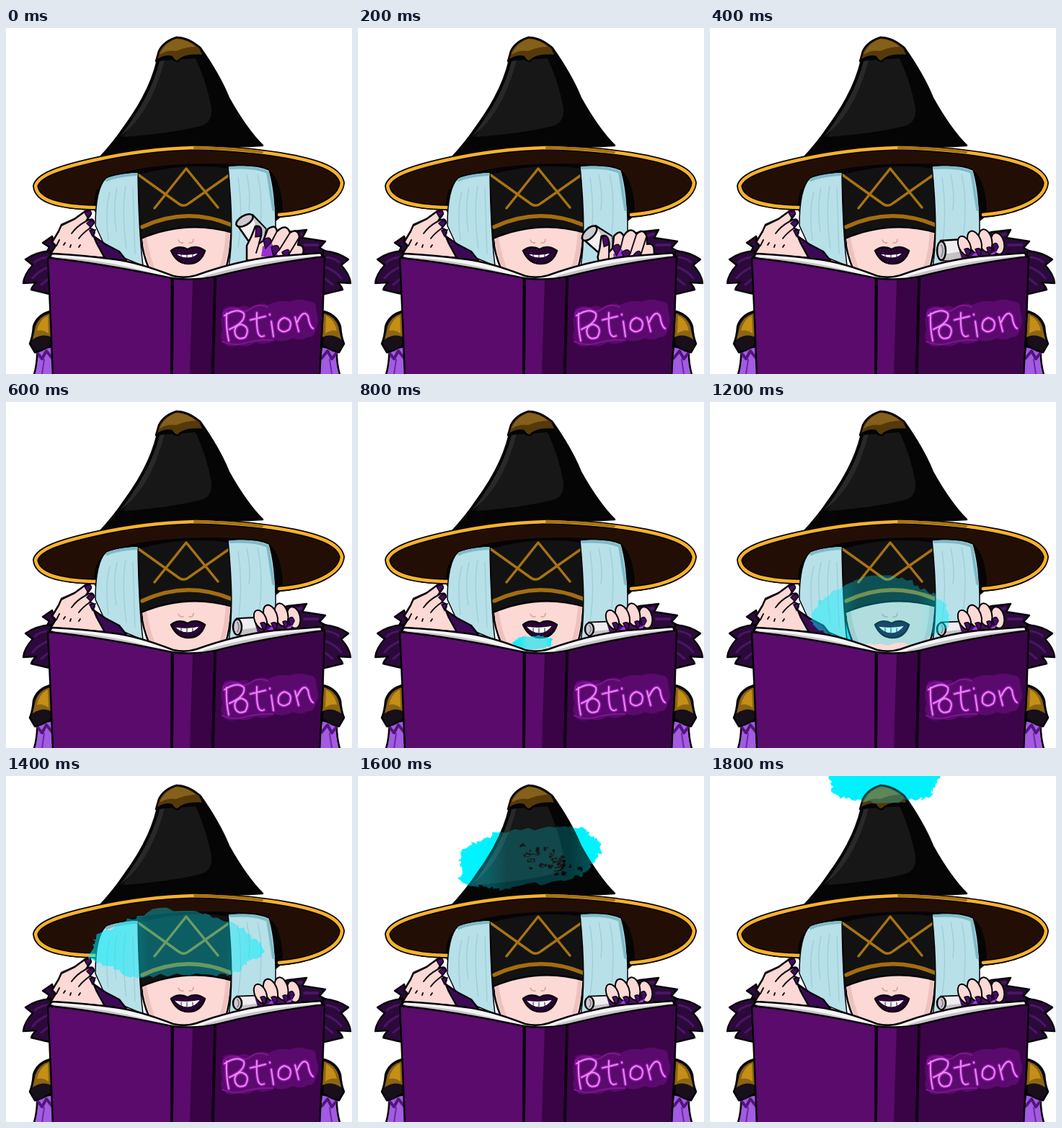
These frames come from a looping animation (480x480 px, 2000 ms). An HTML page:

```html
<!DOCTYPE html>
<html lang="en">
<head>
<meta charset="utf-8">
<title>Witch reading a potion book</title>
<style>
  html, body { margin: 0; width: 100%; height: 100%; overflow: hidden; background: #fff; }
  svg { display: block; width: 100vw; height: 100vh; }
  .ink { stroke: #050307; stroke-width: 2.5; stroke-linejoin: round; stroke-linecap: round; }
  .line { fill: none; stroke-linecap: round; stroke-linejoin: round; }
  .skin { fill: #fdd9d5; }
  .nail { fill: #4a0a68; stroke: #12021c; stroke-width: 1.5; }
</style>
</head>
<body>
<svg viewBox="0 0 480 480">
  <defs>
    <linearGradient id="mist">
      <stop offset="0" stop-color="#00f3ff"/>
      <stop offset=".22" stop-color="#00ecfa" stop-opacity=".85"/>
      <stop offset=".34" stop-color="#00e6f5" stop-opacity=".62"/>
      <stop offset=".78" stop-color="#00e6f5" stop-opacity=".62"/>
      <stop offset="1" stop-color="#00f3ff"/>
    </linearGradient>
    <g id="sleeve">
      <path class="ink" fill="#2b0a3b" d="M62 309 Q41 311 27 321 L37 329 Q25 342 24 354 L42 353 Q36 359 35 363 Q48 366 64 370Z"/>
      <path class="line" stroke="#4c1465" stroke-width="3" d="M58 318 Q46 319 40 325 M58 332 Q45 337 37 347 M59 348 L49 356"/>
      <path fill="#a35be2" class="ink" d="M43 446 Q44 464 38 484 H70 L64 442Z"/>
      <path class="line" stroke="#52157a" stroke-width="4" d="M42 449 L50 459 56 448 64 458"/>
      <path class="line" stroke="#6b2ba0" stroke-width="2" d="M53 460 L50 480"/>
      <path class="ink" stroke-width="4" fill="#17101a" d="M61 393 Q43 398 38 414 Q37 428 33 438 L40 450 50 447 63 440Z"/>
      <path fill="#8b6512" d="M61 396 Q46 400 41 414 L37 432 Q51 423 63 429Z"/>
      <path fill="#c58f17" d="M58 399 Q46 405 43 420 Q52 418 59 424Z"/>
    </g>
  </defs>

  <path id="mistBack" fill="#00f5ff" fill-rule="evenodd"/>

  <!-- sleeves -->
  <path class="ink" fill="#2b0a3b" d="M378 287 L391 283 417 280 411 291 443 296 435 305 450 313 430 335 395 330Z"/>
  <path class="line" stroke="#4c1465" stroke-width="4" d="M396 289 L410 286 M414 301 L432 301"/>
  <path class="ink" fill="#2b0a3b" d="M64 289 L51 298 60 304 55 314 70 314Z"/>
  <use href="#sleeve"/>
  <use href="#sleeve" transform="translate(502 0) scale(-1 1)"/>

  <!-- hat -->
  <path class="ink" fill="#230e06" d="M39 219 C42 204 68 194 124 181 Q190 166 262 164 Q330 166 380 174 C440 184 465 196 468 215 C466 240 430 258 378 262 L124 252 C72 250 42 242 39 219Z"/>
  <path fill="#060404" d="M122 252 C121 222 130 208 176 197 Q250 183 350 191 Q384 196 384 260 L372 270 130 268Z"/>
  <path class="ink" stroke-width="3" fill="#050505" d="M237 13 Q219 18 212 34 C207 66 190 102 165 136 Q149 160 128 182 Q200 166 262 165 Q320 165 356 163 C338 145 323 122 309 97 C298 70 284 48 270 28 Q253 13 237 13Z"/>
  <path fill="#171717" d="M220 45 C210 76 190 115 162 151 Q225 147 270 136 Q287 131 285 111 Q278 74 263 42Z"/>
  <path fill="#292929" d="M213 46 C205 80 185 116 158 151 C184 131 205 100 220 45Z"/>
  <path class="ink" fill="#54390a" d="M237 13 Q219 18 212 32 L208 46 Q220 37 230 40 Q234 47 239 46 Q246 36 274 38 L269 27 Q253 14 237 13Z"/>
  <path fill="#85601a" d="M236 15 Q219 21 213 37 Q224 30 236 32 Q252 25 264 26 Q250 15 236 15Z"/>
  <path id="rim" class="line" stroke="#080503" stroke-width="8" d="M124 249 C74 248 43 240 41 219 C45 205 70 195 124 183 Q190 168 262 166 Q330 168 380 176 C440 186 463 198 466 215 C464 237 430 255 379 259"/>
  <use href="#rim" id="rimGold"/>
  <path class="line" stroke="#a87313" stroke-width="4" d="M262 166 Q315 167 355 172"/>

  <!-- face and mask -->
  <path class="ink skin" d="M187 270 L189 303 Q193 325 204 346H300Q309 326 311 303L314 268Z"/>
  <path fill="#edc2be" d="M188 289 L192 307 Q196 328 206 346 L212 346 Q198 317 195 288Z M312 278 L309 307 Q304 330 296 346 L290 346 Q303 322 305 279Z"/>
  <path class="line" stroke="#d4a09f" stroke-width="1.5" d="M239 294 Q241 299 246 298 M260 293 Q260 299 254 298"/>
  <path class="ink" stroke-width="2" fill="#121212" d="M182 203 Q247 184 312 194 L315 284 Q251 265 187 292Z"/>
  <path class="line" stroke="#a87313" stroke-width="3.5" d="M184 204 L240 244 Q247 249 254 243 L311 203 M206 250 L250 195 294 249"/>
  <path class="line" stroke="#a36d10" stroke-width="5.5" d="M189 276 Q250 247 312 273"/>
  <path class="ink" stroke-width="1.5" fill="#2c0338" d="M229 309 C236 303 245 303 252 307 C260 302 269 304 276 309 Q270 327 253 327 Q237 327 229 309Z"/>
  <path id="teeth" fill="#fff" stroke="#12021c"/>
  <path class="line" stroke="#28102f" d="M243 314 V319 M251 314 V320 M259 314 V319"/>

  <!-- hair -->
  <g class="ink" style="stroke-width:1.5" fill="#b7e0e9">
    <path d="M183 200 Q152 202 139 208 Q124 222 124 274 L140 309 190 330 Q184 280 183 200Z"/>
    <path d="M308 192 Q345 188 365 197 Q373 223 374 266 L374 312 309 331 Q317 283 308 192Z"/>
  </g>
  <path class="line" stroke="#7fbac7" stroke-width="4" d="M181 203 Q152 205 140 211 M311 194 Q344 192 363 200 L371 252"/>
  <path class="line" stroke="#9ccdd7" stroke-width="1.2" d="M144 228 Q137 252 142 295 M154 222 Q148 248 153 282 M166 219 Q160 255 167 306 M176 222 L179 313 M322 207 Q329 258 322 304 M334 203 Q340 230 337 253 M349 203 Q357 236 352 286"/>

  <!-- left hand -->
  <path class="ink" fill="#3c0a55" d="M119 287 L138 300 157 310 168 324 124 319Z"/>
  <path class="ink skin" d="M62 313 L69 302 64 297 73 282 77 273 95 265 110 254 Q117 252 118 258 L111 268 Q121 262 122 270 L116 278 Q126 280 121 287 L126 299 137 319Z"/>
  <path class="line" stroke="#151015" stroke-width="2" d="M111 268 Q98 275 91 285 M116 278 Q106 285 101 292 M77 274 L91 267 M70 302 L74 294 M89 304 L90 301 M101 304 L103 301 M80 301 L82 298"/>
  <path class="nail" d="M109 256 Q119 250 118 258 L113 263Z M112 271 Q121 263 122 271 L117 276Z M116 281 L124 280 120 289Z"/>

  <!-- right hand: raised, then resting on the book -->
  <g id="raised">
    <path class="ink" fill="#f4f0f2" d="M320 272 L342 259 360 278 355 306 336 295Z"/>
    <path fill="#c9c5ca" d="M343 262 L360 279 356 300 349 285Z"/>
    <ellipse class="ink" stroke-width="1.5" fill="#cfcad0" cx="331" cy="267" rx="13" ry="6.5" transform="rotate(-31 331 267)"/>
    <path class="ink skin" d="M334 322 L334 302 340 290 346 275 Q356 273 354 288 L351 299 357 295 363 279 Q374 271 376 282 Q389 270 394 284 Q405 277 407 290 L405 301 Q415 301 412 313 L409 326Z"/>
    <path class="line" stroke="#151015" stroke-width="2" d="M376 282 L366 301 M394 284 L379 308 M407 290 L393 313 M351 299 L347 312"/>
    <path fill="#9b31d0" d="M356 303 L369 299 378 317 354 317Z"/>
    <path class="nail" d="M347 276 Q357 275 353 289 L346 290Z M357 294 Q367 287 368 297 L360 306Z M368 304 Q379 298 379 308 L371 317Z M383 311 Q394 303 393 313 L386 319Z"/>
  </g>
  <g id="resting">
    <g id="tube">
      <path class="ink" fill="#f1edef" d="M320 295 L352 293 356 324 320 322Z"/>
      <path fill="#c5c1c6" d="M323 314 L355 309 355 324 323 322Z"/>
      <ellipse class="ink" stroke-width="1.5" fill="#cfcad0" cx="321" cy="309" rx="6" ry="13"/>
      <path class="line" stroke="#8d8892" stroke-width="2" d="M321 301 Q325 309 321 317"/>
    </g>
    <path fill="#43105c" d="M344 303 L400 293 411 319 350 323Z"/>
    <g class="ink skin" style="stroke-width:2">
      <ellipse cx="399" cy="299" rx="9" ry="15" transform="rotate(-12 399 299)"/>
      <ellipse cx="382" cy="295" rx="9" ry="16" transform="rotate(-13 382 295)"/>
      <ellipse cx="367" cy="297" rx="9" ry="16" transform="rotate(-20 367 297)"/>
      <ellipse cx="353" cy="302" rx="8" ry="14" transform="rotate(-23 353 302)"/>
    </g>
    <path class="nail" d="M353 307 Q360 303 361 311 L358 318Z M368 307 Q376 303 376 312 L373 318Z M384 305 Q391 301 391 310 L388 316Z M392 301 Q398 295 400 304 L395 313Z"/>
    <path fill="#a13bdc" d="M363 316 L369 311 373 318Z M389 313 L398 309 393 317Z"/>
  </g>

  <path id="mistFront" fill="url(#mist)" fill-rule="evenodd"/>

  <!-- book -->
  <path class="ink" fill="#f7f5f7" d="M60 318 L64 313 Q105 315 151 321 Q183 325 232 344 Q248 348 264 343 Q320 323 372 317 L437 312 440 320 290 351H230Z"/>
  <path fill="#c9c5ca" d="M70 318 Q150 322 222 346 L190 340 64 319Z M272 345 Q350 322 433 316 L433 320 290 348Z"/>
  <g class="ink">
    <path fill="#5a0b6c" d="M58 319 Q125 325 230 347 V484 H65 Q62 400 58 319Z"/>
    <path fill="#5a0b6c" d="M230 347 Q258 351 290 345 L286 484 H230Z"/>
    <path fill="#3d0549" d="M290 345 Q360 327 442 317 Q440 400 435 484 H286Z"/>
  </g>
  <path fill="#390346" d="M259 350 L288 347 285 480 H255Z"/>
  <path class="line" stroke="#0d0313" stroke-width="4" d="M231 349 L230 480 M290 347 L287 480"/>

  <!-- glowing title -->
  <path fill="#5a0a6d" d="M302 389 Q311 383 321 388 Q332 383 339 389 Q352 379 364 384 Q381 376 392 380 Q408 374 418 379 Q432 379 430 392 Q436 408 430 416 Q429 430 418 429 Q410 435 398 430 Q385 437 373 433 Q359 441 347 436 Q333 444 323 440 Q307 445 303 437 Q295 429 300 419 Q296 403 302 389Z"/>
  <path class="line" stroke="#7d1590" stroke-width="2" d="M301 396 Q305 387 322 389 Q331 397 341 388 Q350 382 363 387 M300 435 Q315 441 328 438 Q349 432 370 433"/>
  <g role="img" aria-label="Potion" class="line">
    <path id="title" stroke="#9317aa" stroke-width="5" d="M306 396 Q305 416 309 434 M303 399 Q321 387 330 396 Q333 408 310 418 M326 411 Q315 414 318 425 Q322 434 332 429 Q340 415 326 411 M348 395 Q347 414 350 424 Q353 430 358 427 M339 405 L360 400 M368 407 L371 428 M366 397 L366 398 M386 402 Q376 405 378 417 Q384 425 393 418 Q399 405 386 402 M401 401 L406 421 M404 408 Q413 389 419 400 Q421 414 426 417"/>
    <use href="#title" id="titleCore"/>
  </g>
</svg>
<script>
  const $ = id => document.getElementById(id);
  const STEP = 200, STEPS = 10;

  // step: [cx, cy, rx, ry, slope, dome, opacity]
  const clouds = {
    4: [243, 334, 27, 9, -.05, 0, 1],
    5: [240, 313, 60, 29, 0, 16, .75],
    6: [238, 289, 94, 48, 0, 36, .48],
    7: [235, 232, 117, 46, 0, 34, .58],
    8: [236, 113, 97, 39, -.12, 0, .38],
    9: [241, 3, 75, 33, 0, 0, .45]
  };

  const rand = n => {
    const v = Math.sin(n * 127.1) * 43758.5453;
    return v - Math.floor(v);
  };
  const clamp = v => Math.max(0, Math.min(1, v));

  // rough-edged rounded box; dome lowers the ends of its top side
  function blob(cx, cy, rx, ry, slope, dome, seed, count, rough) {
    const round = v => Math.sign(v) * Math.abs(v) ** .72;
    const points = Array.from({ length: count }, (_, i) => {
      const a = i / count * Math.PI * 2;
      const grow = 1 + .04 * Math.sin(a * 7 + seed);
      const dx = rx * round(Math.cos(a)) * grow;
      const up = Math.max(0, -round(Math.sin(a)));
      const dy = ry * round(Math.sin(a)) * grow + dx * slope + dome * up * (dx / rx) ** 2;
      const jitter = k => (rand(seed * 300 + i * 2 + k) - .5) * rough;
      return (cx + dx + jitter(0)).toFixed(1) + ' ' + (cy + dy + jitter(1)).toFixed(1);
    });
    return 'M' + points.join('L') + 'Z';
  }

  function mist(step) {
    if (!clouds[step]) return '';
    const [cx, cy, rx, ry, slope, dome] = clouds[step];
    let d = blob(cx, cy, rx, ry, slope, dome, step, 120, Math.min(6, ry / 3));
    // dark holes left as the cloud thins over the hat
    if (step === 8) for (let i = 0; i < 40; i++) {
      const spread = k => rand(i * 4 + k) + rand(i * 4 + k + 1) - 1;
      d += blob(267 + spread(1) * 45, 118 + spread(2) * 27, 1 + rand(i) * 4, 1 + rand(i + 50) * 2, 0, 0, i + 20, 10, 3);
    }
    return d;
  }

  function overlay(from, to, color, width) {
    const copy = $(from).cloneNode();
    copy.id = to;
    copy.setAttribute('stroke', color);
    copy.setAttribute('stroke-width', width);
    $(to).replaceWith(copy);
  }

  // mouth opens from a slight to a wide smile
  function teeth(open) {
    const half = 15 + 3 * open, top = 313 - 2 * open, low = 319 + 2 * open;
    return `M${251 - half} ${top} Q251 ${top + 3} ${252 + half} ${top - 1} Q262 ${low} 252 ${low} Q241 ${low} ${251 - half} ${top}Z`;
  }

  const shapes = Array.from({ length: STEPS }, (_, i) => mist(i));
  overlay('rim', 'rimGold', '#f9b22c', 4.5);
  overlay('title', 'titleCore', '#e88af2', 2);

  function draw() {
    const step = Math.floor(performance.now() / STEP) % STEPS;
    const settle = clamp((step - 2) / 2);
    $('raised').style.display = step < 2 ? '' : 'none';
    $('resting').style.display = step < 2 ? 'none' : '';
    $('raised').setAttribute('transform', `translate(${-2 * step} ${6 * step}) rotate(${-14 * step} 375 305)`);
    $('tube').setAttribute('transform', `translate(0 ${322 * .32 * settle + 2 * settle}) scale(1 ${1 - .32 * settle})`);
    $('teeth').setAttribute('d', teeth(settle));
    for (const id of ['mistBack', 'mistFront']) $(id).setAttribute('d', shapes[step]);
    $('mistFront').setAttribute('opacity', clouds[step] ? clouds[step][6] : 0);
    requestAnimationFrame(draw);
  }
  draw();
</script>
</body>
</html>
```
